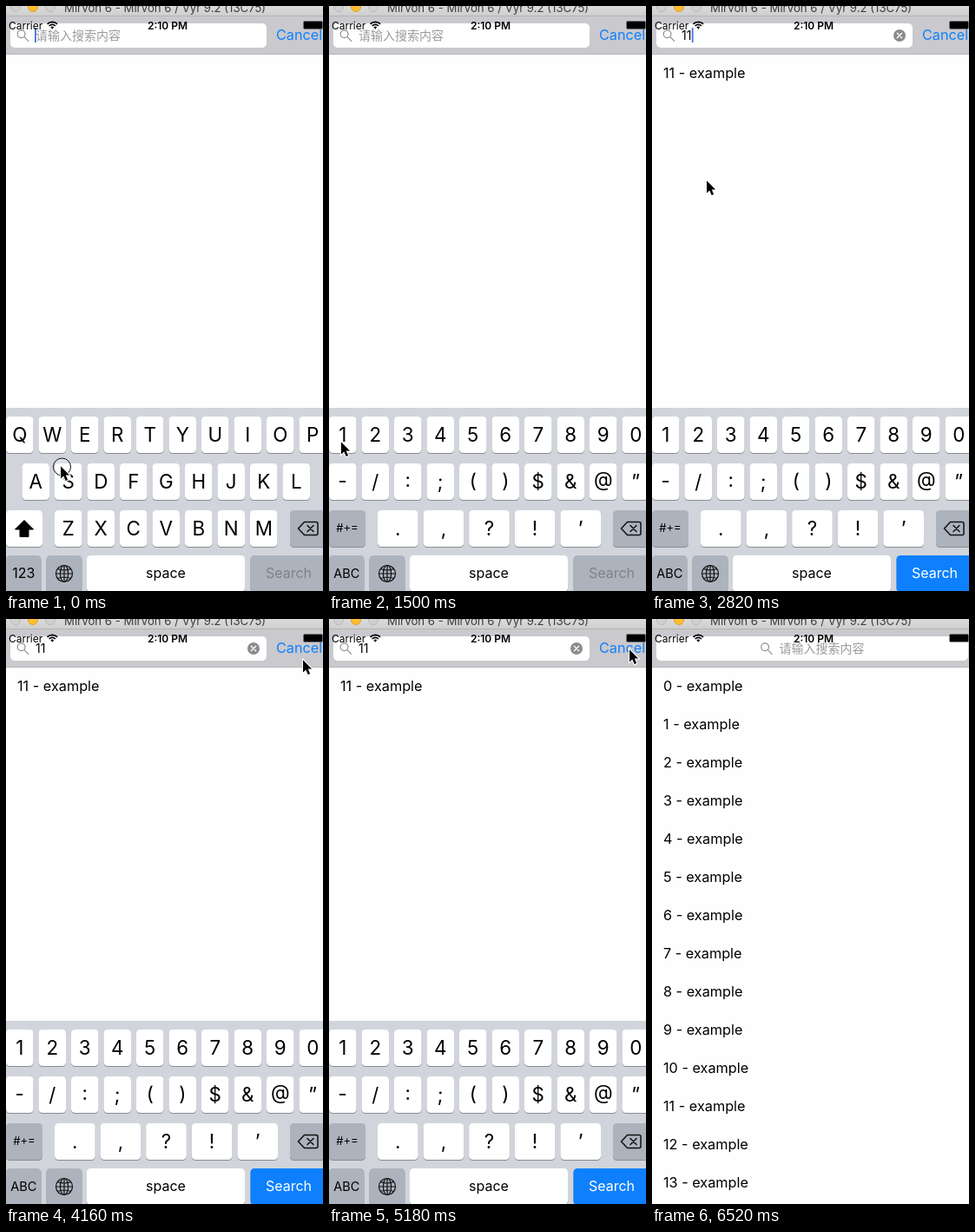
Write an HTML page that moves like this. It is 365 px wide and 674 px high and loops after 6.81 s.

```html
<!DOCTYPE html>
<html lang="en">
<head>
<meta charset="utf-8">
<title>Search bar demo</title>
<style>
  html, body { margin: 0; width: 100%; height: 100%; overflow: hidden; background: #fefefe; }
  svg { display: block; width: 100%; height: 100%; }
  text { font-family: Inter, "Noto Sans CJK SC", "Noto Sans CJK", sans-serif; font-size: 16px; white-space: pre; }
  .mid { text-anchor: middle; }
  .key { font-feature-settings: "case"; }
  #list text { font-size: 16.25px; }
  .line { fill: none; stroke-linecap: round; stroke-linejoin: round; }
</style>
</head>
<body>
<svg viewBox="0 0 365 674">
  <defs>
    <linearGradient id="chrome" x2="0" y2="1">
      <stop stop-color="#dadada"/><stop offset="1" stop-color="#cfcfcf"/>
    </linearGradient>
  </defs>
  <rect width="365" height="674" fill="#fefefe"/>
  <g id="list"></g>

  <rect y="11" width="365" height="45" fill="#c9c9ce"/>
  <rect y="55" width="365" height="1" fill="#b7b7bb"/>
  <rect id="field" x="5" y="20" height="28" rx="5" fill="#fff"/>
  <g id="hint">
    <g class="line" stroke="#8e8e93" stroke-width="1.2">
      <circle cx="17.6" cy="32.3" r="4.4"/><path d="M21 35.7l4.6 4.6"/>
    </g>
    <text id="prompt" x="34" y="39" fill="#9a9a9f" style="font-size:14px">请输入搜索内容</text>
  </g>
  <text id="query" x="34" y="38.5" style="font-size:14px"></text>
  <g id="clear">
    <circle cx="285" cy="34" r="7" fill="#8a8a8f"/>
    <path class="line" d="M282.3 31.3l5.4 5.4m0-5.4l-5.4 5.4" stroke="#fff" stroke-width="1.3"/>
  </g>
  <rect id="caret" y="25" width="1.8" height="17" fill="#4a70e0"/>
  <text id="cancel" x="311" y="39" fill="#0f7ffc" style="font-size:16.2px">Cancel</text>

  <rect width="365" height="11" fill="url(#chrome)"/>
  <rect y="11" width="365" height="1" fill="#b4b4b4"/>
  <g stroke-width="1">
    <circle cx="11" cy="1" r="5.5" fill="#d0d0d0" stroke="#bababa"/>
    <circle cx="31" cy="1" r="5.5" fill="#fdbd2e" stroke="#e0a02a"/>
    <circle cx="51" cy="1" r="5.5" fill="#d0d0d0" stroke="#bababa"/>
  </g>
  <text x="67" y="6.5" fill="#3c3c3c" style="font-size:13.2px">Mirvon 6 - Mirvon 6 / Vyr 9.2 (13C75)</text>
  <text x="3" y="26.5" style="font-size:12px">Carrier</text>
  <g class="line" stroke="#000" stroke-width="1.7" style="stroke-linecap:butt">
    <path d="M47.6 20.8a8 8 0 0 1 11.4 0M49.7 23a5 5 0 0 1 7.2 0"/>
    <path d="M51.4 24.3L53.3 26.8L55.2 24.3Q53.3 22.8 51.4 24.3z" fill="#000" stroke="none"/>
  </g>
  <text class="mid" x="186" y="26.5" style="font-size:12px;font-weight:600">2:10 PM</text>
  <rect x="342.5" y="17.5" width="22" height="9" rx="1.5" fill="none" stroke="#000" stroke-opacity=".45"/>
  <rect x="343" y="18" width="21" height="8"/>

  <g id="keyboard">
    <rect y="463" width="365" height="212" fill="#d1d5db"/>
    <g id="letters"></g>
    <g id="symbols"></g>
    <g id="shared"></g>
    <path d="M21 592.5L31.5 603H26V611.5H16V603H10.5z" stroke="#000" stroke-linejoin="round" id="shift"/>
    <g class="line" stroke="#111" stroke-width="1.5">
      <path d="M343.5 594.5H357Q359 594.5 359 596.5V607.5Q359 609.5 357 609.5H343.5L336.5 602z"/>
      <path d="M347 598.5l7 7m0-7l-7 7"/>
    </g>
    <g class="line" stroke="#111" stroke-width="1.2">
      <circle cx="67" cy="654" r="9.5"/><ellipse cx="67" cy="654" rx="4.6" ry="9.5"/>
      <path d="M67 644.5v19M57.5 654h19M59.5 648.5q7.5 3 15 0M59.5 659.5q7.5-3 15 0"/>
    </g>
  </g>

  <g id="pointer">
    <circle id="ring" cx="2.5" cy="1" r="10" fill="#fff" fill-opacity=".25" stroke="#111"/>
    <path d="M1 .3V14.5L4.3 11.5L6.7 17.1L9.1 16.1L6.8 10.6H11.1z" stroke="#fff" stroke-width="2" paint-order="stroke"/>
  </g>
</svg>
<script>
const LOOP = 6810, TICKS = 46;
const GRAY = '#adb3bd', BLUE = '#0e80fd';
const $ = id => document.getElementById(id);

function add(parent, tag, attrs, label) {
  const el = document.createElementNS('http://www.w3.org/2000/svg', tag);
  for (const name in attrs) el.setAttribute(name, attrs[name]);
  if (label) el.textContent = label;
  return parent.appendChild(el);
}

function key(parent, x, y, w, label, size = 22.4, fill = '#fff') {
  add(parent, 'rect', { x, y: y + 1, width: w, height: 42, rx: 4.5, fill: '#898c91' });
  const face = add(parent, 'rect', { x, y, width: w, height: 42, rx: 4.5, fill });
  const text = add(parent, 'text', {
    x: x + w / 2, y: Math.round(y + 21 + size * 0.34), class: 'mid key', style: `font-size:${size}px`
  }, label);
  return { face, text };
}

function row(parent, labels, x, y, pitch = 37.5) {
  [...labels].forEach((c, i) => key(parent, x + i * pitch, y, pitch - 6, c));
}

row($('letters'), 'QWERTYUIOP', 0, 473);
row($('letters'), 'ASDFGHJKL', 18.5, 527);
row($('letters'), 'ZXCVBNM', 56, 581);
key($('letters'), 0, 581, 42, '');
key($('letters'), 0, 633, 40.5, '123', 16, GRAY);

row($('symbols'), '1234567890', 0, 473);
row($('symbols'), '-/:;()$&@”', 0, 527);
row($('symbols'), '.,?!’', 56, 581, 52.6);
key($('symbols'), 0, 581, 42, '#+=', 13, GRAY);
key($('symbols'), 0, 633, 40.5, 'ABC', 14.5, GRAY);

key($('shared'), 327, 581, 44, '', 16, GRAY);
key($('shared'), 46.5, 633, 41, '', 16, GRAY);
key($('shared'), 93, 633, 182, 'space', 16);
const search = key($('shared'), 281.5, 633, 88, 'Search', 16, GRAY);

const items = Array.from({ length: 20 }, (_, i) => `${i} - example`);
const rows = Array.from({ length: 14 }, (_, i) =>
  add($('list'), 'text', { x: 13, y: 83 + 44 * i }));

// Tracks: [tick, value, ...]
const pointerPath = [
  [0, 62, 530], [1, 56, 552], [3, 20, 649], [4, 19, 652], [5, 19, 652], [7, 15, 549],
  [8, 14, 515], [9, 13, 503], [10, 13, 502], [18, 13, 502], [19, 62, 201], [21, 120, 165],
  [24, 275, 75], [26, 316, 50], [28, 341, 47], [29, 344, 39], [30, 345, 35], [35, 345, 35],
  [36, 344, 37], [37, 343, 90], [39, 325, 625], [42, 270, 660], [43, 256, 668], [44, 245, 695]
];
const barGrow = [[34, 0], [36, 0.73], [38, 1]];
const hintSlide = [[34, 0], [36, 0.865], [38, 1]];
const keysDrop = [[34, 0], [36, 0.895], [37, 1]];

function at(track, k) {
  const i = track.findIndex(p => p[0] >= k);
  if (i < 0) return track[track.length - 1].slice(1);
  if (i === 0) return track[0].slice(1);
  const a = track[i - 1], b = track[i], u = (k - a[0]) / (b[0] - a[0]);
  return a.slice(1).map((v, j) => v + (b[j + 1] - v) * u);
}

const show = (el, on) => el.setAttribute('visibility', on ? 'visible' : 'hidden');
const move = (el, x, y) => el.setAttribute('transform', `translate(${x} ${y})`);

function caretOn(k) {
  if (k >= 35) return false;
  if (k < 12) return (k + 2) % 7 < 4;
  return k >= 13 && (k < 16 || (k - 16) % 7 < 4);
}

function render(k) {
  const query = k < 13 ? '' : k < 16 ? '1' : k < 35 ? '11' : '';
  const found = k < 13 ? [] : items.filter(s => s.includes(query));
  rows.forEach((el, i) => { el.textContent = found[i] || ''; });

  const [grow] = at(barGrow, k), [slide] = at(hintSlide, k), [drop] = at(keysDrop, k);
  $('field').setAttribute('width', 295 + 64 * grow);
  move($('hint'), 112.5 * slide, 0);
  move($('cancel'), 64 * grow, 0);
  $('cancel').setAttribute('opacity', k === 33 ? 0.4 : 1 - grow);
  move($('keyboard'), 0, 211 * drop);

  $('query').textContent = query;
  show($('prompt'), !query);
  show($('clear'), query);
  show($('caret'), caretOn(k));
  $('caret').setAttribute('x', 33 + 6.4 * query.length);

  const letters = k < 5;
  show($('letters'), letters);
  show($('shift'), letters);
  show($('symbols'), !letters);
  search.face.setAttribute('fill', query ? BLUE : GRAY);
  search.text.setAttribute('fill', query ? '#fff' : '#7d838d');

  move($('pointer'), ...at(pointerPath, k));
  show($('ring'), [0, 4, 12, 15, 32, 33].includes(k));
}

const start = performance.now();
let last = -1;
function loop() {
  const k = Math.floor((performance.now() - start) % LOOP / LOOP * TICKS);
  if (k !== last) render(last = k);
  requestAnimationFrame(loop);
}
loop();
</script>
</body>
</html>
```
